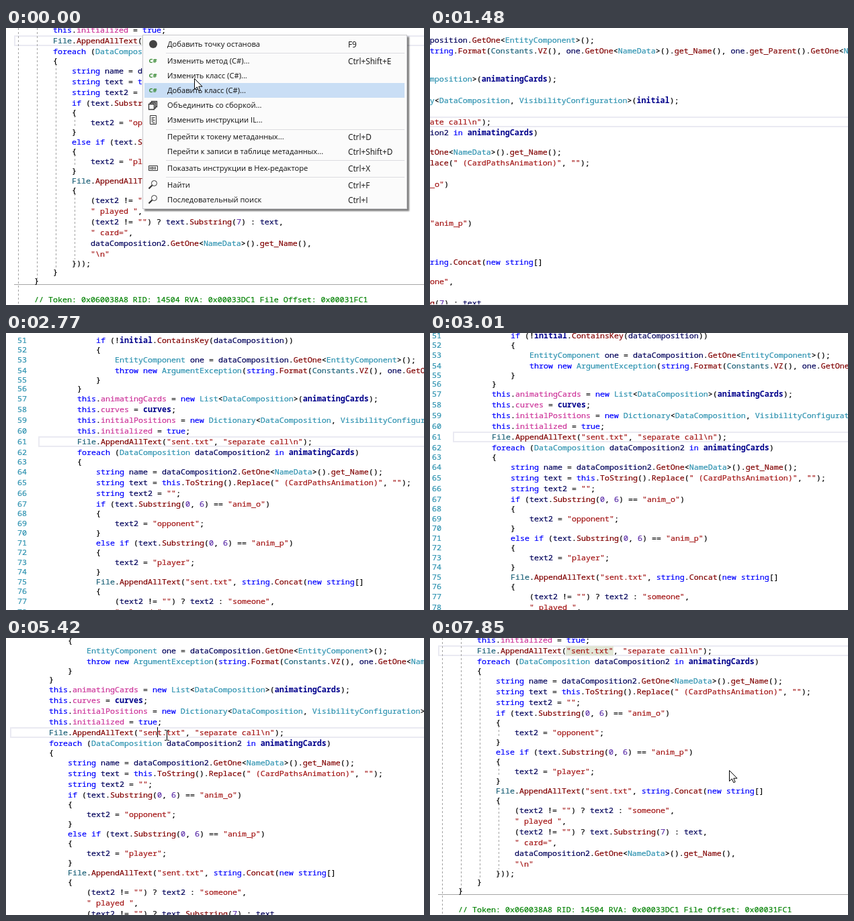
Write an HTML page that moves like this. It is 622 px wide and 413 px high and loops after 8 s.

```html
<!DOCTYPE html>
<html lang="ru">
<head>
<meta charset="utf-8">
<title>Code editor</title>
<style>
html, body { margin: 0; width: 100%; height: 100%; overflow: hidden; background: #fff; }
#stage { position: relative; width: 622px; height: 413px; overflow: hidden; background: #fff; }
#stage div, #stage svg { position: absolute; }
.view { left: 0; top: 0; }
.line, .num { font: 11.667px/16px "Noto Sans Mono", "DejaVu Sans Mono", monospace; white-space: pre;
  font-kerning: none; font-variant-ligatures: none; color: #000; margin-top: 1px; -webkit-text-stroke: .2px; }
.num { color: #2b91af; left: -89px; }
.kw { color: #00f; } .type { color: #2b91af; } .stat { color: #1b6077; } .str { color: #a31515; }
.num-lit { color: #5b2da8; } .field { color: #c39; } .local { color: #00005a; } .meth { color: #800000; }
.par { color: #00008b; font-weight: 700; -webkit-text-stroke: 0; }
.com { color: #008000; }
.row { box-sizing: border-box; height: 16px; border: 2px solid #eaeaf2; }
.guide { width: 1px; background: repeating-linear-gradient(#a2a2a2 0 3px, transparent 3px 6px); }
#menu { left: 203px; top: 10px; width: 392px; height: 258px; background: #fbfbfb; border: 1px solid #c8c8cc;
  box-shadow: 3px 3px 2px rgba(0,0,0,.5); }
#hover { left: 2px; width: 387px; height: 22px; background: #c9def5; }
.item, .key { font: 11.17px/18px "Open Sans", "Noto Sans", sans-serif; white-space: pre; color: #111; }
.item { left: 36px; } .key { left: 305px; font-size: 11.8px; }
.sep { left: 34px; width: 355px; height: 1px; background: #dcdce0; }
</style>
</head>
<body>
<div id="stage">
  <div id="main" class="view"></div>
  <div id="menu"><div id="hover"></div></div>
  <div id="dialog" style="left:0;top:0;width:622px;height:413px;background:#fff"><div id="editor" class="view"></div></div>
  <svg id="arrow" width="14" height="21" style="left:0;top:0"><path d="M.5.5V16.5L4.3 13 6.8 18.6 9.2 17.6 6.8 12.2H12Z" fill="#fff" stroke="#000"/></svg>
  <svg id="beam" width="7" height="16" style="left:0;top:0"><path d="M0 .5H3M4 .5H7M3.5 1V15M0 15.5H3M4 15.5H7" fill="none" stroke="#000"/></svg>
</div>
<script>
const $ = id => document.getElementById(id);
const LOOP = 8000, CH = 7, FIRST = 51, ANCHOR = 10;

// One leading ">" per indent level; the call line sits at level 2.
const CODE = `>>>if (!initial.ContainsKey(dataComposition))
>>>{
>>>>EntityComponent one = dataComposition.GetOne<EntityComponent>();
>>>>throw new ArgumentException(string.Format(Constants.VZ(), one.GetOne<NameData>().get_Name(), one.get_Parent().GetOne<NameData>().get_Name()));
>>>}
>>}
>>this.animatingCards = new List<DataComposition>(animatingCards);
>>this.curves = curves;
>>this.initialPositions = new Dictionary<DataComposition, VisibilityConfiguration>(initial);
>>this.initialized = true;
>>File.AppendAllText("sent.txt", "separate call\\n");
>>foreach (DataComposition dataComposition2 in animatingCards)
>>{
>>>string name = dataComposition2.GetOne<NameData>().get_Name();
>>>string text = this.ToString().Replace(" (CardPathsAnimation)", "");
>>>string text2 = "";
>>>if (text.Substring(0, 6) == "anim_o")
>>>{
>>>>text2 = "opponent";
>>>}
>>>else if (text.Substring(0, 6) == "anim_p")
>>>{
>>>>text2 = "player";
>>>}
>>>File.AppendAllText("sent.txt", string.Concat(new string[]
>>>{
>>>>(text2 != "") ? text2 : "someone",
>>>>" played ",
>>>>(text2 != "") ? text.Substring(7) : text,
>>>>" card=",
>>>>dataComposition2.GetOne<NameData>().get_Name(),
>>>>"\\n"
>>>}));
>>}
>}

>// Token: 0x060038A8 RID: 14504 RVA: 0x00033DC1 File Offset: 0x00031FC1`.split("\n");

const words = s => new Set(s.split(" "));
const KEYWORDS = words("this new if else foreach in string true throw");
const TYPES = words("DataComposition EntityComponent NameData VisibilityConfiguration Dictionary List ArgumentException");
const STATICS = words("File Constants");
const PARAMS = words("animatingCards curves initial");

function kind(tok, before, after) {
  if (tok.startsWith("//")) return "com";
  if (tok[0] === '"') return "str";
  if (/^\d/.test(tok)) return "num-lit";
  if (!/^\w/.test(tok)) return "";
  if (KEYWORDS.has(tok)) return "kw";
  if (TYPES.has(tok)) return "type";
  if (STATICS.has(tok)) return "stat";
  if (before.endsWith("this.") && after[0] !== "(") return "field";
  if (PARAMS.has(tok)) return "par";
  return before.endsWith(".") ? "meth" : "local";
}

function add(parent, cls, style, text) {
  const el = document.createElement("div");
  el.className = cls;
  for (const k in style) el.style[k] = typeof style[k] === "number" ? style[k] + "px" : style[k];
  if (text) el.textContent = text;
  parent.append(el);
  return el;
}

function addCode(parent, x, y, src) {
  const row = add(parent, "line", { left: x, top: y });
  for (const m of src.matchAll(/\/\/.*|"[^"]*"|\w+|[^\w"]+/g)) {
    const span = document.createElement("span");
    span.className = kind(m[0], src.slice(0, m.index), src.slice(m.index + m[0].length));
    span.textContent = m[0];
    row.append(span);
  }
}

// Lines holding only braces are shorter, and their baseline is higher.
let y = 0;
const lines = CODE.map(raw => {
  const text = raw.replace(/^>+/, ""), thin = !/\w|"/.test(text);
  const line = { text, x: (raw.length - text.length - 2) * 4 * CH, y: thin ? y - 2 : y };
  y += thin ? 13 : 16;
  return line;
});
const origin = lines[ANCHOR].y;
lines.forEach(l => l.y -= origin);

// Decompiled view
const main = $("main");
main.style.transform = "translate(70px,10px)";
add(main, "row", { left: -58, top: 1, width: 640 });
add(main, "", { left: 132, top: 2, width: 71, height: 14, background: "#e2e6d6" });
[[-52, -10, 420], [-24, -10, 369], [4, 44, 348], [32, 121, 138], [32, 179, 196], [32, 237, 335]]
  .forEach(([x, a, b]) => add(main, "guide", { left: x, top: a, height: b - a }));
add(main, "", { left: -58, top: 372, width: 620, height: 1, background: "#a5a5a5" });
lines.slice(ANCHOR - 1).forEach(l => addCode(main, l.x, l.y, l.text));

// Edit window
const editor = $("editor");
add(editor, "row", { left: -58, top: 1, width: 1400 });
lines.slice(0, 30).forEach((l, i) => {
  add(editor, "num", { top: l.y }, String(FIRST + i));
  addCode(editor, l.x, l.y, l.text);
});
add(editor, "", { left: -100, top: 281, width: 1400, height: 20, background: "#ececee" });
const caret = add(editor, "", { top: 1, width: 1, height: 15, background: "#000" });

// Context menu
const menu = $("menu");
const svg = s => `<svg width="16" height="16" viewBox="0 0 16 16" style="left:0;top:0" fill="none" stroke="#333">${s}</svg>`;
const ICONS = {
  dot: '<circle cx="8" cy="8" r="6" fill="#424242" stroke="none"/>',
  cs: '<text x="1.5" y="11" font-family="Open Sans, sans-serif" font-size="9.5" font-weight="700" fill="#388a34" stroke="none">C#</text>',
  merge: '<path d="M1.5 6.5H9.5V14.5H1.5ZM3.5 6V4.5H11.5V12.5H10M5.5 4V2.5H13.5V10.5H12" stroke-width="1.3"/>',
  doc: '<path d="M3.5 1.5H12.5V14.5H3.5ZM5.5 4.5H10.5M5.5 6.5H8.5M5.5 8.5H10.5M5.5 10.5H8.5M7 12.5H10.5"/>',
  hex: '<path d="M1.5 4.5H14.5V11.5H1.5ZM3.5 6V10M5.5 6.5H7.5V9.5H5.5ZM9.5 6V10M11.5 6V10"/>',
  find: '<circle cx="9.5" cy="5.5" r="4"/><path d="M6.5 8.5L1.5 13.5" stroke-width="2.2"/>'
};
[
  [24, "dot", "Добавить точку останова", "F9"],
  [49, "cs", "Изменить метод (C#)...", "Ctrl+Shift+E"],
  [71, "cs", "Изменить класс (C#)..."],
  [93, "cs", "Добавить класс (C#)..."],
  [115, "merge", "Объединить со сборкой..."],
  [137, "doc", "Изменить инструкции IL..."],
  [162, "", "Перейти к токену метаданных...", "Ctrl+D"],
  [184, "", "Перейти к записи в таблице метаданных...", "Ctrl+Shift+D"],
  [209, "hex", "Показать инструкции в Hex-редакторе", "Ctrl+X"],
  [234, "find", "Найти", "Ctrl+F"],
  [256, "find", "Последовательный поиск", "Ctrl+I"]
].forEach(([cy, icon, label, key]) => {
  const top = cy - 20;
  if (icon) add(menu, "", { left: 7, top: top + 1, width: 16, height: 16 }).innerHTML = svg(ICONS[icon]);
  add(menu, "item", { top }, label);
  if (key) add(menu, "key", { top }, key);
});
[37, 151, 197, 222].forEach(cy => add(menu, "sep", { top: cy - 11 }));

// Step tables: start time, then the values held until the next step.
const SCREEN = [[0, "menu"], [930, "blank"], [1080, "edit"], [7580, "main"]];
const HOVER = [[0, 82], [150, 60], [290, 38]];
const CAMERA = [[0, -235, 138], [1210, -259, 131], [2470, -190, 131], [2620, -60, 131], [2770, 106, 153],
  [2890, 102, 151], [3010, 92, 146], [3160, 68, 134], [3470, 64, 132]];
const CARET = [[0, -1], [3470, 0], [3620, -1], [4050, 0], [4180, -1], [4750, 0], [4880, 23], [5540, -1],
  [5930, 23], [6050, 24], [6320, 25], [7030, -1]];
const POINTER = [[0, "arrow", 280, 75], [150, "arrow", 283, 64], [290, "arrow", 287, 57], [410, "arrow", 289, 52],
  [540, "arrow", 290, 50], [810, "beam", 291, 57], [930, "beam", 289, 57], [1210, "beam", 285, 56],
  [1360, "beam", 208, 53], [1480, ""], [3900, "beam", 190, 105], [4050, "beam", 234, 149], [4180, "beam", 244, 142],
  [4330, "beam", 229, 137], [4450, "beam", 235, 140], [4750, "beam", 238, 143], [4880, "beam", 239, 141],
  [5000, "beam", 241, 147], [5150, "beam", 246, 150], [5270, "beam", 247, 151], [5420, "beam", 239, 145],
  [5540, "beam", 237, 144], [5660, "beam", 234, 143], [5930, "beam", 236, 145], [6050, "beam", 376, 196],
  [6200, "beam", 415, 192], [6320, "beam", 372, 194], [6470, "beam", 410, 190], [6600, "beam", 437, 187],
  [7580, ""], [7850, "arrow", 445, 197]];

const at = (steps, t) => steps.findLast(s => s[0] <= t).slice(1);
const show = (id, on) => $(id).style.visibility = on ? "visible" : "hidden";
const move = (el, x, y) => el.style.transform = `translate(${x}px,${y}px)`;

function draw(t) {
  const [screen] = at(SCREEN, t), [col] = at(CARET, t), [shape, px, py] = at(POINTER, t);
  $("menu").style.display = screen === "menu" ? "" : "none";
  $("dialog").style.display = screen === "edit" || screen === "blank" ? "" : "none";
  editor.style.display = screen === "edit" ? "" : "none";
  $("hover").style.top = at(HOVER, t)[0] - 11 + "px";
  move(editor, ...at(CAMERA, t));
  caret.style.display = col < 0 ? "none" : "";
  caret.style.left = col * CH + "px";
  show("arrow", shape === "arrow");
  show("beam", shape === "beam");
  if (shape === "arrow") move($("arrow"), px, py);
  if (shape === "beam") move($("beam"), px - 3, py - 8);
}

const start = performance.now();
function tick() {
  draw(Math.max(0, performance.now() - start) % LOOP);
  requestAnimationFrame(tick);
}
draw(0);
requestAnimationFrame(tick);
</script>
</body>
</html>
```
